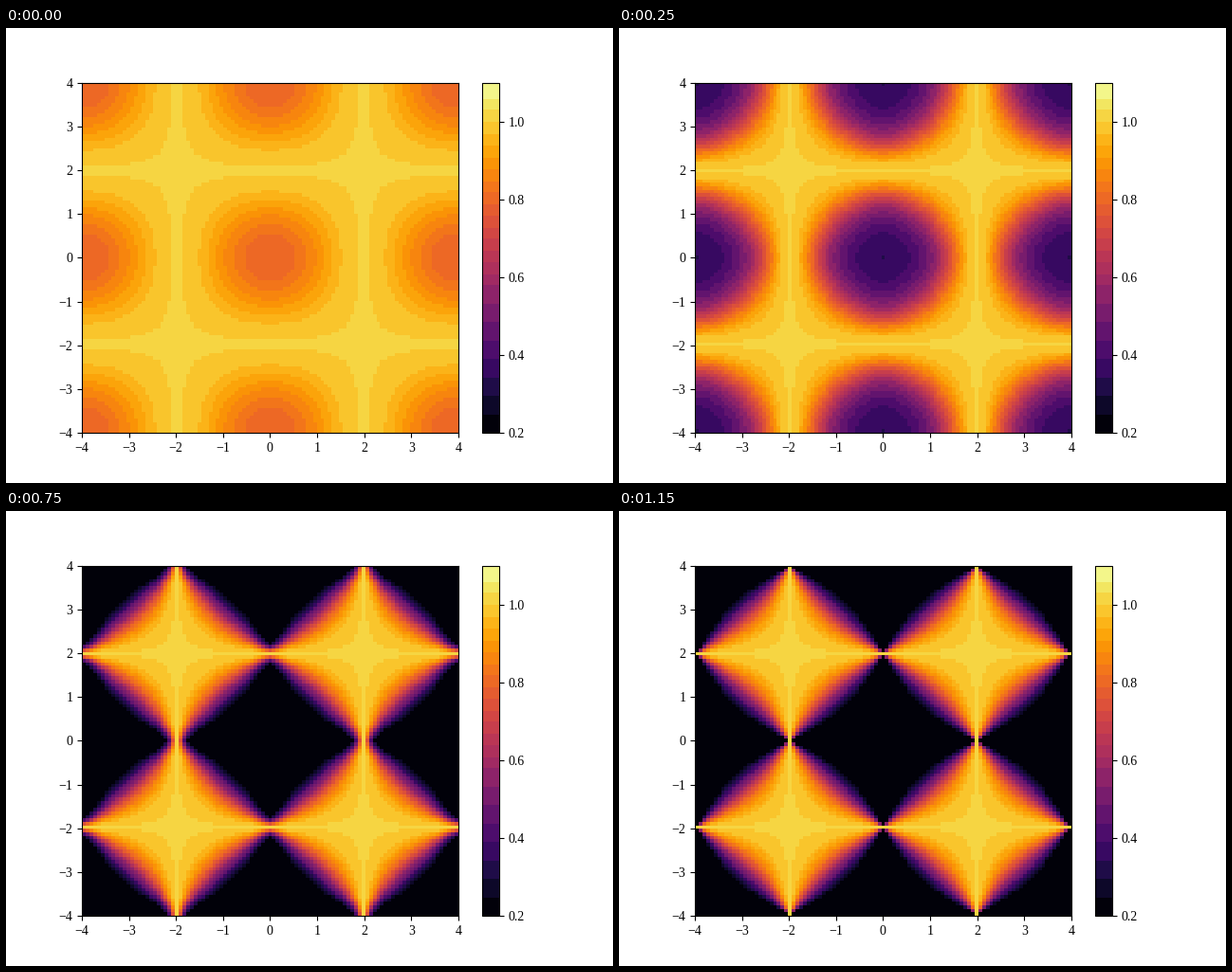
Recreate the animation shown at these times as a matplotlib script. Size 640x480 px, loop 1250 ms.

```python
import numpy as np
import matplotlib.pyplot as plt
from matplotlib.animation import FuncAnimation
from matplotlib.colors import ListedColormap

plt.rcParams["font.family"] = "Liberation Serif"
plt.rcParams["font.size"] = 10

LOW, HIGH = 0.2, 1.1
CONTRASTS = (0.21, 0.66, 0.95, 0.989, 0.999)


def banded_inferno(split=0.578, step=0.03, dark_bands=8):
    """Inferno in flat bands, wider ones at the dark end."""
    edges = np.concatenate([
        np.linspace(LOW, split, dark_bands, endpoint=False),
        np.arange(split, HIGH - step, step),
        [HIGH],
    ])
    levels = LOW + (HIGH - LOW) * (np.arange(256) + 0.5) / 256
    band = np.searchsorted(edges, levels) - 1
    tone = edges[band] + 0.35 * np.diff(edges)[band]
    return ListedColormap(plt.get_cmap("inferno")((tone - LOW) / (HIGH - LOW)))


axis = np.linspace(-4, 4, 101)
wave = np.cos(np.pi * axis / 4) ** 2
both = np.outer(wave, wave)
either = wave[:, None] + wave[None, :] - 2 * both


def field(a):
    return 1 - a * both / (1 - a * either)


fig, ax = plt.subplots(figsize=(6.4, 4.8), dpi=100)
image = ax.imshow(field(CONTRASTS[0]), cmap=banded_inferno(), vmin=LOW,
                  vmax=HIGH, extent=(-4, 4, -4, 4), origin="lower",
                  aspect="auto", interpolation="nearest")
ax.set(xticks=range(-4, 5), yticks=range(-4, 5))
fig.colorbar(image, ax=ax, ticks=np.arange(0.2, 1.1, 0.2))


def update(i):
    image.set_data(field(CONTRASTS[i]))
    return (image,)


anim = FuncAnimation(fig, update, frames=len(CONTRASTS), interval=250,
                     repeat=True, repeat_delay=0)
plt.show()
```
